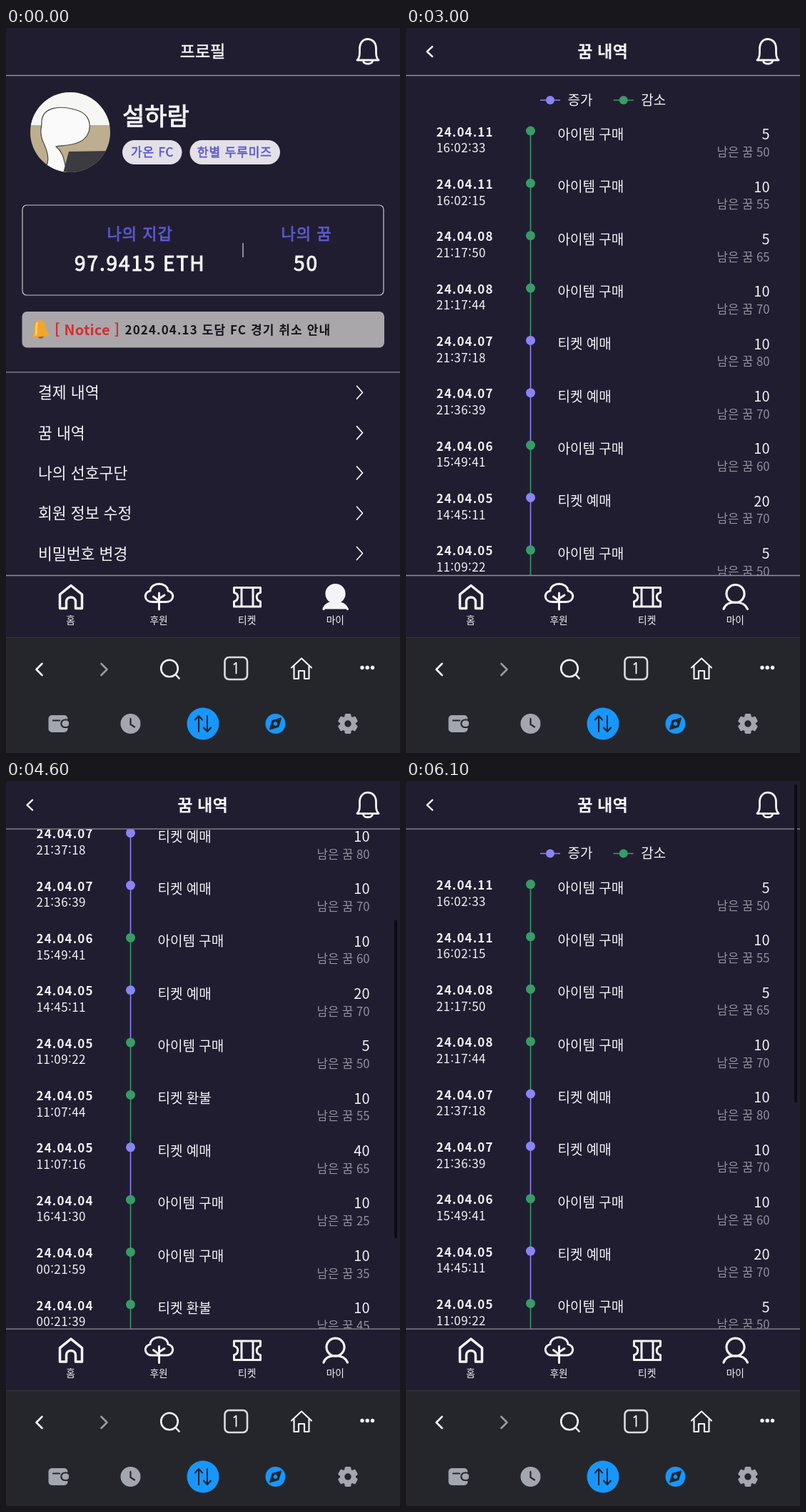
Animation of 552 by 1015 pixels, one loop 6.2 s. Source, as an HTML page:

```html
<!DOCTYPE html>
<html lang="ko">
<head>
<meta charset="utf-8">
<title>프로필</title>
<style>
html, body { margin: 0; height: 100%; overflow: hidden; background: #211d31; }
svg { display: block; }
text { font-family: "Noto Sans CJK KR", "Noto Sans CJK", "Noto Sans", sans-serif; white-space: pre; }
.line { fill: none; stroke: #f4f3f7; stroke-linecap: round; stroke-linejoin: round; }
</style>
</head>
<body>
<svg width="552" height="1015" viewBox="0 0 552 1015">
  <defs>
    <clipPath id="view"><rect y="67" width="552" height="699"/></clipPath>
    <clipPath id="face"><circle cx="90" cy="146" r="56"/></clipPath>
  </defs>
  <rect width="552" height="1015" fill="#211d31"/>

  <g id="page">
    <g id="profile">
      <g clip-path="url(#face)">
        <rect x="34" y="90" width="112" height="112" fill="#bcae8f"/>
        <rect x="34" y="90" width="112" height="46" fill="#f6f6f5"/>
        <path d="M50 135C48 108 80 108 102 116C122 123 122 150 104 159C90 166 74 164 70 166C82 176 80 184 86 203H50C62 190 60 178 54 164C48 152 48 144 50 135Z" fill="#fafafa" stroke="#4a4742" stroke-width="1.2"/>
        <path d="M88 173L147 172L138 203H80Z" fill="#3b3b40"/>
      </g>
      <rect x="163" y="157" width="83.500" height="34" rx="17" fill="#e3e1e7"/>
      <rect x="257.500" y="157" width="126.500" height="34" rx="17" fill="#e3e1e7"/>
      <rect x="23" y="248" width="506" height="126" rx="6" fill="none" stroke="#c9c8cd" stroke-width="1.200"/>
      <path d="M332 301V321" stroke="#d8d7dc" stroke-width="1.200"/>
      <rect x="22.500" y="397" width="507.500" height="50.500" rx="7" fill="#a9a7aa"/>
      <g transform="rotate(-5 48 422)">
        <circle cx="48" cy="431" r="4" fill="#b5641c"/>
        <path d="M48 409C40 409 40 418 39.500 423C39 428 36 429 36 432H60C60 429 57 428 56.500 423C56 418 56 409 48 409Z" fill="#f3a52b"/>
        <path d="M45 412C42 416 43 424 41 430" fill="none" stroke="#ffd468" stroke-width="2.500"/>
      </g>
      <path d="M0 481.800H552" stroke="#8e8c95" stroke-width="1.300"/>
      <g id="menu"></g>
    </g>

    <g id="history">
      <path class="line" d="M37 26L29.500 33L37 40" stroke-width="2.400"/>
      <g clip-path="url(#view)"><g id="list"></g></g>
    </g>

    <path class="line" stroke-width="2.800" d="M492 45C496 41 495.500 36 495.500 29C495.500 21 500 15.500 507 15.500S518.500 21 518.500 29C518.500 36 518 41 522 45ZM500.500 46C501 51.500 513 51.500 513.500 46"/>
    <path d="M0 66.500H552M0 766.500H552" stroke="#918f98" stroke-width="1.300"/>

    <g class="line" stroke-width="3.500">
      <path d="M75.500 793L91 780.500L106.500 793V812.500H97.500V803C97.500 795 84.500 795 84.500 803V812.500H75.500Z"/>
      <path stroke-width="3" d="M206 803.500C193 804 192 790 202 788C203 775 226 775 227 788C237 790 236 804 223 803.500ZM214.500 791V814M214.500 802L206.500 796M214.500 799L222 794"/>
      <path d="M319.500 783.500H356.500V790.500C349.500 792 349.500 801 356.500 803V810H319.500V803C326.500 801 326.500 792 319.500 790.500ZM330 784V809M346 784V809" stroke-width="3"/>
      <g id="person" stroke-width="3.200">
        <circle cx="461.500" cy="792" r="12.500"/>
        <path d="M445 813.500C447 807 453 804 461.500 804S476 807 478.500 813.500"/>
      </g>
    </g>
    <g id="tabs"></g>
    <rect id="bar" x="544" width="4" rx="2" fill="#0d0a17"/>
  </g>

  <rect y="853" width="552" height="162" fill="#25262b"/>
  <path d="M0 853.500H552" stroke="#34343b"/>
  <g class="line" stroke-width="2.600">
    <path d="M50.500 890L42.500 898L50.500 906"/>
    <path d="M133.500 890L141.500 898L133.500 906" stroke="#9a9ba1"/>
    <circle cx="229" cy="896.500" r="11.800"/><path d="M237.500 905L242.500 910.500"/>
    <rect x="306.500" y="881" width="31.500" height="31" rx="6" stroke="#dcdce0"/>
    <path d="M319.500 891L322.500 888.800V903.500" stroke-width="1.800"/>
    <path d="M400 895.500L414 882.500L428 895.500M403.500 893.500V911H410V900H418V911H424.500V893.500" stroke-width="2.200"/>
  </g>
  <g fill="#f4f3f7"><circle cx="499" cy="895.500" r="2.700"/><circle cx="506.200" cy="895.500" r="2.700"/><circle cx="513.500" cy="895.500" r="2.700"/></g>
  <g fill="#a4a6ae">
    <rect x="59.500" y="962" width="27" height="24" rx="5"/>
    <circle cx="174.500" cy="974" r="14"/>
    <g id="gear"><circle cx="479" cy="974" r="11"/></g>
  </g>
  <g fill="none" stroke="#25262b" stroke-width="2.200" stroke-linecap="round">
    <path d="M66 969.500H75"/>
    <path d="M89 968.500H82.500A5 5 0 0 0 82.500 979H89"/>
    <path d="M174.500 967V975L180 978.500"/>
  </g>
  <path d="M88 971H83.500A2.800 2.800 0 0 0 83.500 976.500H88Z" fill="#a4a6ae"/>
  <circle cx="479" cy="974" r="4.700" fill="#25262b"/>
  <circle cx="276" cy="974" r="22.500" fill="#1797fd"/>
  <path d="M270 985V963M265 968.500L270 963L275 968.500M282 963V985M277 979.500L282 985L287 979.500" fill="none" stroke="#15202c" stroke-width="2" stroke-linecap="round" stroke-linejoin="round"/>
  <circle cx="377.500" cy="974" r="14" fill="#1797fd"/>
  <path d="M385 966.500L381.500 978L370 981.500L373.500 970Z" fill="#25262b" stroke="#25262b" stroke-width="2" stroke-linejoin="round"/>
  <circle cx="377.500" cy="974" r="2.700" fill="#1797fd"/>
</svg>
<script>
const LOOP = 6200, STEP = 100, PITCH = 73.35;
const OPEN = 1600, FADE_START = 1640, STAGGER = 100, FADE = 200;
const GREEN = '#379c66', VIOLET = '#8885f6', INDIGO = '#5d59cd';
const $ = id => document.getElementById(id);

function add(parent, tag, attrs, content = '') {
  const el = document.createElementNS('http://www.w3.org/2000/svg', tag);
  for (const k in attrs) el.setAttribute(k, attrs[k]);
  el.textContent = content;
  return parent.appendChild(el);
}

// w: weight, ls: letter spacing, thick: outline width for weights between regular and bold
function label(parent, x, y, size, content, { w = 400, ls = 0, anchor = 'start', fill = '#f4f3f7', thick = 0 } = {}) {
  const style = `font-size:${size}px;font-weight:${w};letter-spacing:${ls}px;fill:${fill};stroke:${fill};stroke-width:${thick}px`;
  return add(parent, 'text', { x, y, 'text-anchor': anchor, style }, content);
}

const profile = $('profile'), history_ = $('history'), list = $('list');
const mid = { anchor: 'middle' };

label(profile, 275.5, 41, 23, '프로필', { thick: .6, ...mid });
label(profile, 163, 136, 34, '설하람', { thick: 1 });
label(profile, 175, 180, 17, '가온 FC', { thick: .6, ls: .8, fill: INDIGO });
label(profile, 268, 180, 17, '한별 두루미즈', { thick: .6, ls: .9, fill: INDIGO });
label(profile, 141.5, 296, 22, '나의 지갑', { thick: .8, ls: 1, fill: INDIGO });
label(profile, 385.5, 296, 22, '나의 꿈', { thick: .8, ls: 1, fill: INDIGO });
label(profile, 96, 339.5, 28, '97.9415 ETH', { thick: 1, ls: 1.9 });
label(profile, 403, 339.5, 28, '50', { thick: 1, ls: 1.9 });
label(profile, 68, 429.5, 20, '[ Notice ]', { w: 700, ls: .2, fill: '#d62d31' });
label(profile, 166.5, 428.5, 17, '2024.04.13 도담 FC 경기 취소 안내', { w: 700, ls: 1.1, fill: '#17151c' });

['결제 내역', '꿈 내역', '나의 선호구단', '회원 정보 수정', '비밀번호 변경'].forEach((name, i) => {
  const y = 510.3 + i * 56.3;
  label($('menu'), 45, y + 8, 21.6, name);
  add($('menu'), 'path', { class: 'line', 'stroke-width': 1.7, d: `M491.500 ${y - 9}L499.500 ${y}L491.500 ${y + 9}` });
});

['홈', '후원', '티켓', '마이'].forEach((name, i) =>
  label($('tabs'), 90.5 + i * 123.6, 833.5, 13.7, name, mid));

for (let i = 0; i < 6; i++)
  add($('gear'), 'rect', { x: 474.5, y: 960, width: 9, height: 8, rx: 2, transform: `rotate(${i * 60} 479 974)` });

label(history_, 275.5, 41, 23.2, '꿈 내역', { w: 700, ...mid });
[[202, '증가', VIOLET], [304.7, '감소', GREEN]].forEach(([x, name, color]) => {
  add(list, 'path', { d: `M${x - 14} 101H${x + 14}`, stroke: color, 'stroke-width': 1.5 });
  add(list, 'circle', { cx: x, cy: 101, r: 6, fill: color });
  label(list, x + 24.5, 107.8, 19, name);
});

const KINDS = { i: ['아이템 구매', GREEN], t: ['티켓 예매', VIOLET], r: ['티켓 환불', GREEN] };
const rows = `11 16:02:33 i 5 50
11 16:02:15 i 10 55
08 21:17:50 i 5 65
08 21:17:44 i 10 70
07 21:37:18 t 10 80
07 21:36:39 t 10 70
06 15:49:41 i 10 60
05 14:45:11 t 20 70
05 11:09:22 i 5 50
05 11:07:44 r 10 55
05 11:07:16 t 40 65
04 16:41:30 i 10 25
04 00:21:59 i 10 35
04 00:21:39 r 10 45
04 00:21:18 t 40 55
03 23:44:20 i 0 15
03 23:43:52 i 0 15`.split('\n').map((row, i) => {
  const [day, time, kind, amount, left] = row.split(' ');
  const [name, color] = KINDS[kind];
  const g = add(list, 'g', { transform: `translate(0 ${i * PITCH})` });
  add(g, 'path', { d: `M174.500 144v${PITCH}`, stroke: color, 'stroke-width': 1.6 });
  add(g, 'circle', { cx: 174.5, cy: 144, r: 6.5, fill: color });
  label(g, 42.5, 151.7, 17, '24.04.' + day, { w: 700, ls: 1.1 });
  label(g, 42.5, 174.3, 17, time, { ls: .4 });
  label(g, 212.5, 156, 19, name);
  label(g, 509.5, 156.3, 20, amount, { anchor: 'end' });
  label(g, 509.5, 180, 16.7, '남은 꿈 ' + left, { anchor: 'end', fill: '#93919e' });
  return g;
});

const clamp = x => Math.max(0, Math.min(1, x));
const part = (t, a, b) => clamp((t - a) / (b - a));
const easeOut = p => 1 - (1 - p) ** 3;
const smooth = p => p * p * (3 - 2 * p);

// Swipe down, swipe back past the top, then settle
function scrollAt(t) {
  if (t < 4300) return 552.6 * easeOut(part(t, 3318, 4300));
  if (t < 5000) return 552.6 - 567.6 * smooth(part(t, 4350, 5000));
  return -15 * (1 - easeOut(part(t, 5000, 5500)));
}

function draw(now) {
  const t = Math.floor(now % LOOP / STEP) * STEP;
  const opened = t >= OPEN, y = scrollAt(t);
  profile.style.display = opened ? 'none' : '';
  history_.style.display = opened ? '' : 'none';
  $('person').setAttribute('fill', opened ? 'none' : '#f4f3f7');
  $('page').setAttribute('transform', `translate(0 ${t >= 4300 ? .6 : 0})`);
  list.setAttribute('transform', `translate(0 ${-y})`);
  rows.forEach((g, i) => g.setAttribute('opacity', clamp((t - FADE_START - i * STAGGER) / FADE)));
  $('bar').style.display = t > 3300 ? '' : 'none';
  $('bar').setAttribute('y', 4 + Math.max(0, y) * .52);
  $('bar').setAttribute('height', 446 + Math.min(0, y));
  requestAnimationFrame(draw);
}
draw(performance.now());
</script>
</body>
</html>
```
